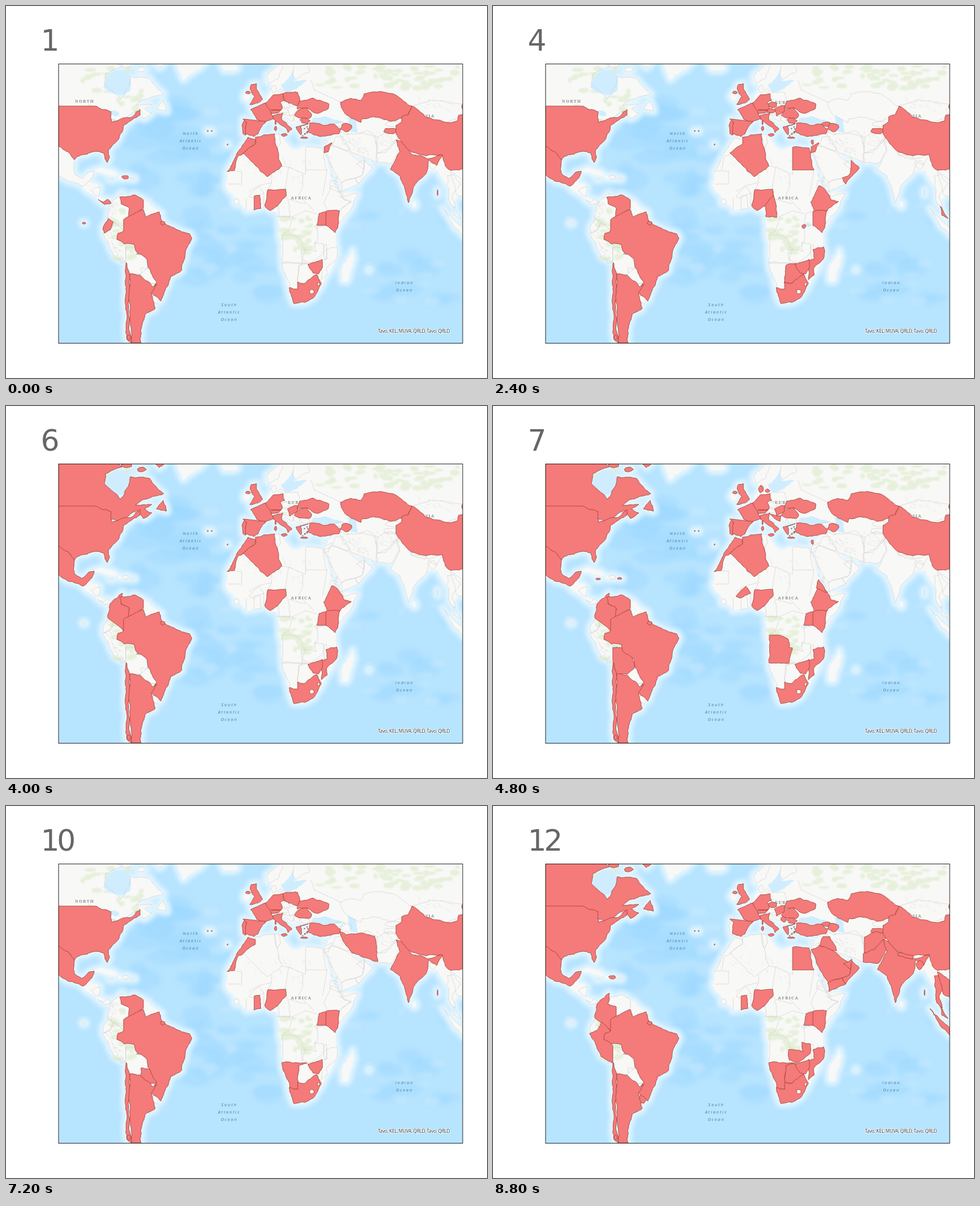
An HTML page that plays this animation: 851 px wide and 658 px high, repeating every 9.6 s.

```html
<!DOCTYPE html>
<html lang="en">
<head>
<meta charset="utf-8">
<title>Countries by month</title>
<style>
  html, body { margin: 0; width: 100%; height: 100%; overflow: hidden; background: #fff; }
  svg { display: block; width: 100vw; height: 100vh; }
  .month { font: 52px "DejaVu Sans", sans-serif; letter-spacing: -4.3px; fill: #666; }
  .sea { font: italic 7.2px "Open Sans", "Noto Sans", sans-serif; letter-spacing: 2px; fill: #47788f; text-anchor: middle; }
  .land { font: bold 7.2px "Noto Serif", serif; letter-spacing: 1.5px; fill: #8b8b89; }
  .credit { font: 8.2px "Open Sans", "Noto Sans", sans-serif; letter-spacing: -.25px; fill: #333; stroke: #fff; stroke-width: 1.6px; paint-order: stroke; }
  .red { fill: #f57a7a; stroke: #8f3526; stroke-width: .7; stroke-linejoin: round; }
  .border { fill: none; stroke: #cfcaca; stroke-width: .6; }
</style>
</head>
<body>
<svg viewBox="0 0 851 658" preserveAspectRatio="none">
  <defs>
    <clipPath id="frame"><rect x="93" y="102" width="715" height="494"/></clipPath>
    <filter id="soft"><feGaussianBlur stdDeviation="3"/></filter>
    <filter id="blur"><feGaussianBlur stdDeviation="1"/></filter>
  </defs>
  <text class="month" id="month" x="61.5" y="79"></text>
  <g clip-path="url(#frame)">
    <rect x="93" y="102" width="715" height="494" fill="#b7e4ff"/>
    <g id="deep" filter="url(#soft)" fill="#9fd9ff"></g>
    <g id="shelf" filter="url(#soft)" fill="none" stroke-linejoin="round"></g>
    <g id="ground" fill="#f8f8f6"></g>
    <g id="green" filter="url(#blur)" fill="#dfedcf" opacity=".7"></g>
    <g id="water" fill="#d0edff"></g>
    <g id="relief" stroke="#d3d1cd" stroke-width=".7"></g>
    <g id="borders"></g>
    <g id="names"></g>
    <g id="red"></g>
    <text class="credit" x="658" y="578">Tavo, KEL, MUVA, QRLD, Tavo, QRLD</text>
  </g>
  <rect x="93" y="102.5" width="715" height="494" fill="none" stroke="#222"/>
</svg>
<script>
const ALL = '123456789ABC', STEP = 800;
const $ = id => document.getElementById(id);
const add = (id, tag, attrs) => {
  const el = document.createElementNS('http://www.w3.org/2000/svg', tag);
  for (const k in attrs) el.setAttribute(k, attrs[k]);
  return $(id).appendChild(el);
};

let seed = 7;
const rnd = () => (seed = seed * 16807 % 2147483647) / 2147483647;
const hash = (x, y) => { const s = Math.sin(x * 12.99 + y * 78.23) * 43758.5; return s - Math.floor(s) - .5; };

// Splits an edge at a shifted midpoint; the shift is the same from both sides.
function rough([ax, ay], [bx, by]) {
  const len = Math.hypot(bx - ax, by - ay);
  if (len < 5 || ax === bx || ay === by) return [[bx, by]];
  const x = (ax + bx) / 2, y = (ay + by) / 2, amp = Math.min(len * .2, 3);
  const mid = [x + amp * hash(x, y), y + amp * hash(y, x)];
  return [...rough([ax, ay], mid), ...rough(mid, [bx, by])];
}
const ring = text => {
  const n = text.split(' ').map(Number), pts = [];
  for (let i = 0; i < n.length; i += 2) pts.push([n[i], n[i + 1]]);
  return 'M' + pts.flatMap((p, i) => rough(p, pts[(i + 1) % pts.length])).join(' ') + 'z';
};
const blob = (x, y, rx, ry = rx) => {
  const pts = [];
  for (let i = 0; i < 11; i++) {
    const a = i * Math.PI / 5.5, r = 1 + .35 * hash(x + i, y);
    pts.push([x + rx * r * Math.cos(a), y + ry * r * Math.sin(a)]);
  }
  return 'M' + pts.join(' ') + 'z';
};

const countries = [], filler = [];
const land = (months, ...rings) => countries.push([months, rings.map(ring).join('')]);
const small = (months, ...box) => countries.push([months, blob(...box)]);
const plain = text => filler.push(ring(text));
const islet = (...box) => filler.push(blob(...box));

// Americas, filled only in some months
land('56789C', '93 102 198 102 205 108 176 120 174 138 203 165 214 145 220 125 254 128 279 155 240 167 229 176 258 174 245 182 258 189 243 199 232 184 207 205 93 180');
land('56789C', '266 182 278 167 284 186');
land('56789C', '264 102 280 102 271 109');
small('56789C', 214, 105, 9, 4);
small('56789C', 240, 112, 8, 4);
land('456789ABC', '93 245 110 255 122 270 121 296 134 305 146 294 156 292 152 304 136 319 104 306 93 298');
small('15BC', 211, 303, 6, 3);
small('7', 186, 306, 4, 1.5);
small('7', 224, 305, 4, 1.5);
land('1', '163 342 172 347 180 342 186 349 174 351');
land('B', '151 327 166 319 163 337');
land('56789C', '206 331 203 350 218 355 218 374 208 398 180 374 184 350 196 340');
land('123456789AB', '201 338 227 334 243 343 243 358 222 378 217 374 218 357 204 350');
land('1', '181 376 190 382 184 396 174 402 171 394');
small('1', 138, 384, 3, 1.5);
land('BC', '192 382 208 398 198 410 212 424 212 455 191 443 171 402 184 397');
land('7', '212 427 240 430 251 462 238 474 219 476 212 450');
land('9AB', '239 463 255 465 267 490 252 492 238 477');
land('1345678ABC', '213 454 219 476 217 520 222 596 214 590 211 490');
small('1345678ABC', 217, 586, 3, 5);
land('C', '260 505 273 518 267 526 257 522');

// Europe
small('123456789AB', 422, 215, 4, 13);
land('159AB', '490 155 516 153 520 168 515 177 493 168');
small('49', 489, 185, 10, 4);
small('45C', 494, 175, 9, 5);
land('4567BC', '498 182 516 176 516 186 502 195');
small('14C', 529, 203, 8, 5);
small('C', 515, 200, 5, 6);
land('789', '490 191 510 194 508 204 497 198');
land('5', '509 102 533 102 537 116 512 131 507 121');
land('B', '461 122 486 102 491 102 482 128 464 137');
small('7', 474, 147, 4, 6);
small('7', 486, 150, 4, 3);

// Africa
land('156789AB', '391 293 413 254 428 232 441 236 441 245 411 265 404 291');
land('1234567B', '419 260 442 243 441 232 475 226 482 268 488 283 462 302');
land('B', '475 226 484 227 486 242 480 252');
land('4C', '530 250 559 251 568 290 530 290');
land('159ABC', '439 336 449 335 451 358 439 361');
land('7', '430 337 447 319 456 331 438 340');
land('49', '496 328 502 374 483 373 480 352');
small('B', 408, 346, 5);
land('4567B', '576 318 585 322 598 343 611 346 590 364 571 364 562 347');
land('7', '572 322 576 307 592 330');
land('B', '592 337 622 332 610 360 587 387 588 365 611 346');
land('156789ABC', '554 367 570 364 570 388 550 388');
small('4', 550, 390, 3.5);
land('789', '489 405 505 405 522 412 524 427 530 428 524 455 488 454');
land('BC', '523 431 549 434 546 418 562 421 561 438 537 454 524 449');
small('5', 565, 435, 3, 13);
land('4567C', '566 431 585 426 586 443 567 464 568 476 558 484 556 450 569 447');
land('4C', '515 490 519 458 536 455 550 476 536 490');
land('59ABC', '488 454 533 455 518 459 516 501 502 499');
small('5', 642, 467, 1);

// Asia
small('4C', 591, 209, 9, 4);
small('1234567BC', 602, 215, 10, 7);
small('47B', 565, 241, 2, 4);
land('149', '563 249 577 242 570 258 563 260');
land('C', '584 231 596 231 608 256 577 247');
land('C', '563 254 577 247 606 258 634 282 631 298 594 313 576 284');
land('C', '592 313 618 304 624 315 594 328');
land('49C', '634 273 648 286 624 315 618 304 632 296');
land('5BC', '620 279 635 271 632 288');
land('9AB', '589 221 602 228 624 225 652 230 658 275 634 268 612 260 596 238');
land('1567C', '592 170 605 165 628 167 634 155 662 151 684 155 718 177 712 193 680 204 649 196 630 199 628 206 611 199 603 193 593 179');
small('14C', 680, 221, 12, 5);
small('9', 684, 209, 13, 5);
land('C', '657 232 677 222 700 226 688 243 672 259 657 260');
land('5C', '655 261 676 253 690 236 697 254 682 278 655 276');
land('159ABC', '690 237 701 240 717 262 744 270 775 262 762 282 748 272 745 292 721 320 712 348 697 300 680 289 697 258');
small('159ABC', 763.5, 330, .6, 5);
land('5C', '717 258 744 264 742 271 716 264');
small('5C', 755, 281, 6, 8);
land('59', '719 177 750 166 808 174 808 194 781 206 743 197');
land('5BC', '781 300 792 298 805 314 789 336 795 357 785 348');
land('5C', '786 293 808 308 808 338 796 332');
land('459C', '791 354 805 376 794 370');
land('9C', '773 358 808 392 808 406 790 386');

// Filled all year; these cover their neighbours' inner edges
land(ALL, '93 177 158 177 186 187 187 206 207 198 226 194 237 183 237 193 208 211 199 236 181 255 183 268 179 277 173 260 158 257 127 266 121 272 110 258 93 248');
land(ALL, '208 378 229 366 243 360 247 374 271 364 276 383 301 395 325 403 329 411 318 432 311 467 291 478 274 522 257 507 267 489 251 462 249 447 229 432 227 422 209 421 196 413 198 402 208 398');
small(ALL, 277, 384, 4, 3);
land(ALL, '219 474 237 476 253 488 259 497 267 492 257 508 264 535 246 546 238 574 239 596 222 596 218 500');
land(ALL, '434 139 443 137 443 147 454 165 450 169 431 174 440 160 432 147');
small(ALL, 428, 153, 4, 2.5);
land(ALL, '433 183 453 174 460 171 474 178 469 190 474 199 460 204 444 201');
small(ALL, 477, 206, 1, 4);
land(ALL, '419 200 460 204 446 226 439 231 424 226 426 206');
land(ALL, '459 172 473 157 490 155 493 167 485 171 489 180 483 188 469 190', '469 184 487 184');
land(ALL, '472 194 490 189 488 201 506 218 499 224 497 218 481 206 473 200');
small(ALL, 492, 228, 5, 2.5);
small(ALL, 477, 217, 2, 4);
land(ALL, '517 184 532 180 541 193 537 199 521 198 510 193');
land(ALL, '520 168 544 163 571 173 570 182 551 190 546 189 532 180 515 182');
land(ALL, '513 214 535 208 521 213 522 228');
small(ALL, 528, 233, 6, 1.2);
for (let i = 0; i < 9; i++) small(ALL, 525 + 11 * rnd(), 213 + 18 * rnd(), .8);
land(ALL, '537 207 566 211 581 209 592 218 589 226 556 231 534 222');
land(ALL, '458 354 463 325 495 324 496 334 480 354 467 362');
land(ALL, '566 363 590 362 587 392 582 401 566 388');
land(ALL, '534 457 559 448 560 462 553 474 543 472');
land(ALL, '501 498 516 501 516 488 528 491 550 475 558 490 546 514 530 524 509 526');
land(ALL, '718 177 743 197 781 206 799 203 801 193 808 192 808 288 787 291 778 284 772 263 743 265 717 258 701 242 690 226 690 211 700 205 700 196 712 192');
small(ALL, 808, 178, 1.5, 4);
for (const x of [357, 364, 392]) small(ALL, x, x > 380 ? 245 : 221, 1);

// Remaining land
plain('461 125 486 102 808 102 808 330 792 345 780 318 764 290 745 292 700 240 690 272 654 276 612 258 634 285 624 315 594 328 563 250 580 228 605 214 535 205 505 208 485 192 445 190 473 142 461 136');
plain('391 293 428 232 483 227 507 254 530 249 560 251 576 306 592 330 622 332 610 360 582 401 586 443 556 500 524 526 507 524 488 454 481 365 456 355 425 362 390 322');
plain('304 102 352 102 330 118 313 130');
plain('141 309 166 319 164 337 186 349 165 345 135 319');
plain('243 343 275 366 247 375');
plain('154 291 168 286 198 299 186 300');
plain('613 432 616 444 604 487 595 487 596 460');
islet(396, 109, 14, 5);
islet(426, 160, 6, 8);
islet(722, 351, 3, 5);
islet(203, 303, 5, 3);

// Ocean, greenery, relief
const scatter = (id, n, x, y, w, h, size, attrs) => {
  for (let i = 0; i < n; i++) add(id, 'ellipse', {
    cx: x + w * rnd(), cy: y + h * rnd(), rx: size * (.5 + rnd()), ry: size * (.3 + rnd() * .5), ...attrs });
};
const ridges = (n, x, y, dx, dy, spread) => {
  for (let i = 0; i < n; i++) {
    const t = rnd(), px = x + dx * t + spread * (rnd() - .5), py = y + dy * t + spread * (rnd() - .5);
    add('relief', 'path', { d: `M${px} ${py}l${2 + 3 * rnd()} ${2 + 3 * rnd()}`, opacity: .3 + .6 * rnd() });
  }
};
const dark = { opacity: .45 }, pale = { fill: '#c7eaff', opacity: .55 };
scatter('deep', 24, 220, 150, 130, 170, 27, dark);
scatter('deep', 8, 345, 260, 30, 70, 20, dark);
scatter('deep', 22, 325, 370, 140, 140, 22, dark);
scatter('deep', 12, 640, 370, 150, 150, 22, dark);
scatter('deep', 10, 340, 180, 60, 320, 12, pale);
scatter('deep', 12, 580, 340, 200, 230, 11, pale);
scatter('green', 60, 555, 106, 245, 40, 7);
scatter('green', 24, 130, 110, 110, 75, 7);
scatter('green', 26, 190, 360, 40, 90, 7);
scatter('green', 34, 492, 374, 48, 66, 7);
ridges(50, 176, 395, 36, 70, 10);
ridges(35, 190, 345, -10, 40, 12);
ridges(55, 598, 225, 45, 45, 24);
ridges(50, 655, 235, 40, -5, 28);
ridges(50, 565, 260, 30, 85, 10);
ridges(30, 720, 165, 75, 15, 22);
ridges(40, 420, 260, 120, 35, 50);

const shape = filler.join('') + countries.map(c => c[1]).join('');
add('shelf', 'path', { d: shape, stroke: '#cdecff', 'stroke-width': 20 });
add('shelf', 'path', { d: shape, stroke: '#e4f6ff', 'stroke-width': 9 });
filler.concat(countries.map(c => c[1])).forEach(d => add('ground', 'path', { d }));

const seas = [
  ring('500 128 507 112 510 132 533 131 515 146 495 153 486 140'),
  ring('543 198 562 195 600 206 582 209 540 206'),
  ring('604 195 619 200 622 224 610 222'),
  blob(557, 387, 5, 4), blob(193, 190, 8, 5), blob(199, 137, 24, 22),
];
add('water', 'path', { d: seas.join('') });

for (const [, d] of countries) add('borders', 'path', { d, class: 'border' });
add('borders', 'path', { class: 'border',
  d: 'M488 283 500 285 530 298V290M470 297V312L463 327M494 324 500 285M525 298V320L518 335 545 362M430 328 447 318 470 312M404 292H417V315H393M568 290 560 335M500 342 530 350M425 340V362M456 330V355M490 403 500 398 508 372H480M508 372 530 362 552 368M550 388 552 412 545 425M657 232 640 220 624 226M540 131 545 148 592 170' });

const label = (cls, x, y, ...rows) => rows.forEach((row, i) =>
  add('names', 'text', { class: cls, x, y: y + i * 13 }).textContent = row);
label('sea', 327, 227.5, 'North', 'Atlantic', 'Ocean');
label('sea', 395, 531, 'South', 'Atlantic', 'Ocean');
label('sea', 705, 492, 'Indian', 'Ocean');
label('land', 122, 170.5, 'NORTH');
label('land', 504, 341.5, 'AFRICA');
label('land', 499, 173, 'EUROPE');
label('land', 735, 196.5, 'ASIA');
label('land', 230, 440, 'AMERICA');

const fills = countries.map(([months, d]) => [months, add('red', 'path', { d, class: 'red' })]);
const gaps = blob(541, 505, 4) + blob(553, 492, 2, 3);
add('red', 'path', { d: gaps, class: 'red', style: 'fill:#f8f8f6' });

let shown = -1;
function draw(now) {
  const i = Math.floor(now / STEP) % ALL.length;
  if (i === shown) return;
  shown = i;
  $('month').textContent = i + 1;
  for (const [months, el] of fills) el.style.display = months.includes(ALL[i]) ? '' : 'none';
}
const start = performance.now();
const tick = () => { draw(performance.now() - start); requestAnimationFrame(tick); };
tick();
</script>
</body>
</html>
```
